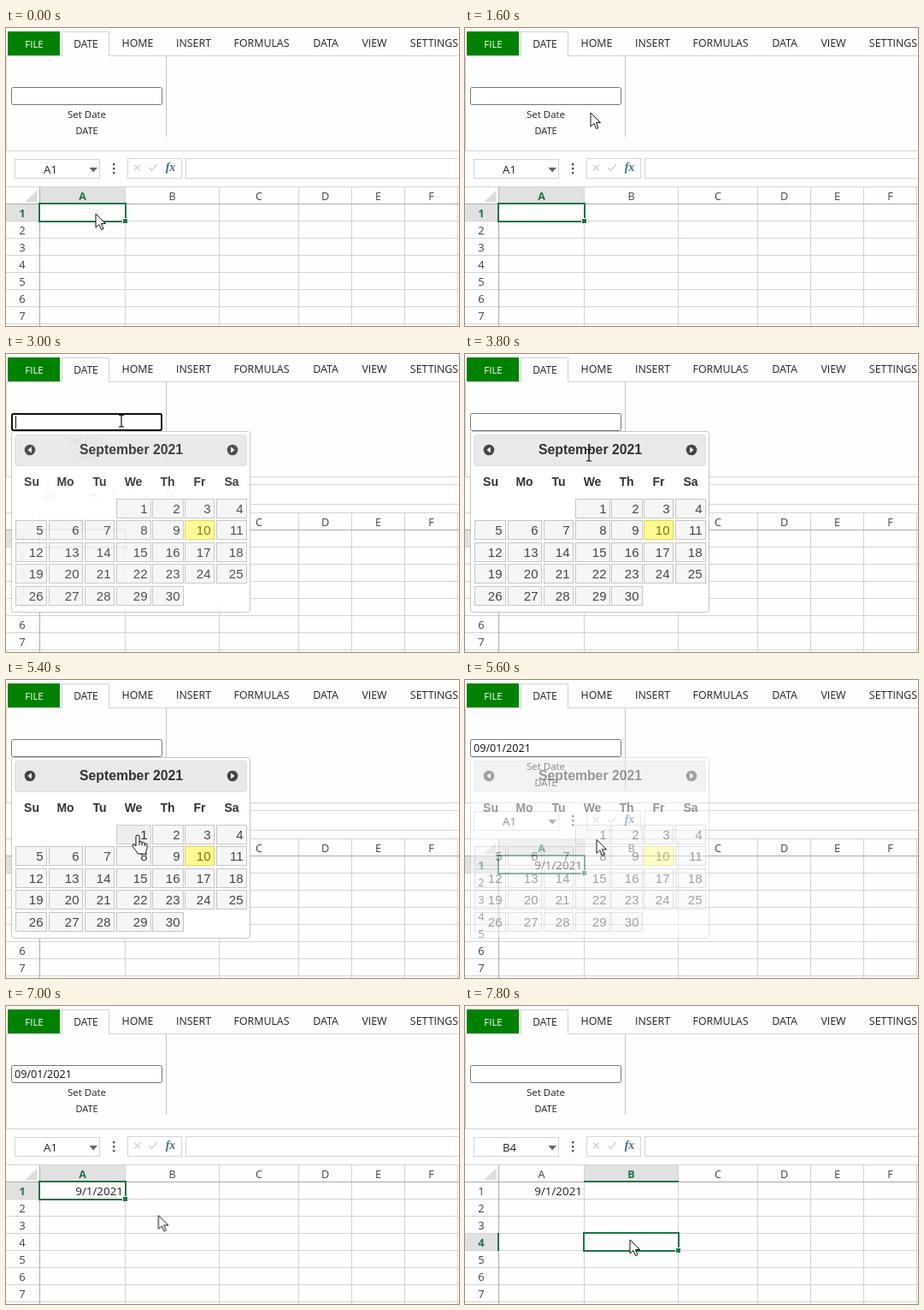
An HTML page that plays this animation: 530x348 px, repeating every 8000 ms.

```html
<!DOCTYPE html>
<html lang="en">
<head>
<meta charset="utf-8">
<title>Date picker in a spreadsheet</title>
<style>
html, body { margin: 0; width: 100%; height: 100%; overflow: hidden; background: #fefefe; }
svg { display: block; width: 530px; height: 348px; font-family: "Open Sans", sans-serif; cursor: default; }
text { white-space: pre; }
.mid { text-anchor: middle; }
.end { text-anchor: end; }
.crisp { shape-rendering: crispEdges; }
.cal text { font-family: "Liberation Sans", Arial, sans-serif; }

/* The clock ticks every 200 ms; the small lead keeps ticks clear of rounding. */
.anim { animation: 8s step-end -10ms infinite; }
#cursor { animation-name: move; }
#arrow { animation-name: arrow; }
#beam { animation-name: beam; }
#hand { animation-name: hand; }
#calendar { animation-name: calendar; }
#dayHover { animation-name: hand; }
#focus { animation-name: focus; }
#inputDate { animation-name: inputDate; }
#cellDate { animation-name: cellDate; }
#colHover { animation-name: colHover; }
#selA1 { animation-name: selA1; }
#selB4 { animation-name: selB4; }

@keyframes move {
  0% { transform: translate(105px, 217px); }
  7.5% { transform: translate(105px, 217px); animation-timing-function: steps(5); }
  20% { transform: translate(147px, 99px); animation-timing-function: steps(3); }
  27.5% { transform: translate(135px, 78px); }
  37.5% { transform: translate(135px, 78px); animation-timing-function: steps(4); }
  47.5% { transform: translate(145px, 118px); animation-timing-function: steps(6); }
  62.5% { transform: translate(154px, 181px); }
  67.5% { transform: translate(154px, 181px); animation-timing-function: steps(3); }
  75% { transform: translate(154px, 197px); animation-timing-function: steps(8); }
  95%, 100% { transform: translate(193px, 273px); }
}
@keyframes arrow {
  0%, 42.5%, 50%, 57.5%, 70%, 100% { opacity: 1; }
  25%, 45%, 55%, 60% { opacity: 0; }
}
@keyframes beam {
  0%, 42.5%, 50%, 57.5%, 100% { opacity: 0; }
  25%, 45%, 55% { opacity: 1; }
}
@keyframes hand {
  0%, 70%, 100% { opacity: 0; }
  60% { opacity: 1; }
}
@keyframes calendar {
  0%, 72.5%, 100% { opacity: 0; }
  37.5% { opacity: .94; }
  40% { opacity: 1; }
  70% { opacity: .5; }
}
@keyframes focus {
  0%, 40%, 100% { opacity: 0; }
  37.5% { opacity: 1; }
}
@keyframes inputDate {
  0%, 97.5%, 100% { opacity: 0; }
  70% { opacity: 1; }
}
@keyframes cellDate {
  0% { opacity: 0; }
  70%, 100% { opacity: 1; }
}
@keyframes colHover {
  0%, 77.5%, 100% { opacity: 0; }
  72.5% { opacity: 1; }
}
@keyframes selA1 {
  0% { opacity: 1; }
  97.5%, 100% { opacity: 0; }
}
@keyframes selB4 {
  0% { opacity: 0; }
  97.5%, 100% { opacity: 1; }
}
</style>
</head>
<body>
<svg id="stage" viewBox="0 0 530 348"></svg>
<script>
const GREEN = '#217346', LINE = '#d4d4d4', INK = '#222';

const rect = (x, y, w, h, fill, extra = '') =>
  `<rect x="${x}" y="${y}" width="${w}" height="${h}" fill="${fill}" ${extra}/>`;
const box = (x, y, w, h, fill, stroke, r = 0) =>
  rect(x + .5, y + .5, w - 1, h - 1, fill, `stroke="${stroke}" rx="${r}"`);
const text = (s, x, y, size, fill = INK, extra = 'class="mid"') =>
  `<text x="${x}" y="${y}" font-size="${size}" fill="${fill}" ${extra}>${s}</text>`;
const path = (d, fill, extra = '') => `<path d="${d}" fill="${fill}" ${extra}/>`;
const hline = (x, y, w, c = LINE) => rect(x, y, w, 1, c);
const vline = (x, y, h, c = LINE) => rect(x, y, 1, h, c);
const anim = (id, body) => `<g id="${id}" class="anim">${body}</g>`;

const cols = [39, 139, 249, 342, 404, 466, 528];
const rowTop = r => 205 + (r - 1) * 20;
const colMid = c => (cols[c] + cols[c + 1]) / 2 + .5;
const colName = c => 'ABCDEF'[c];

function ribbon() {
  const tabs = [['HOME', 154], ['INSERT', 219.5], ['FORMULAS', 299], ['DATA', 374], ['VIEW', 431], ['SETTINGS', 501]];
  return `<g class="crisp">` + hline(0, 32, 66) + hline(120, 32, 410) +
    vline(65, 4, 29) + vline(120, 4, 29) + hline(65, 4, 56) +
    vline(0, 32, 112) + hline(0, 143, 530) + vline(187, 33, 94, '#c4c4c4') +
    rect(2, 4, 61, 28, '#008200') + '</g>' +
    text('FILE', 33, 23, 11.5, '#fff') + text('DATE', 93.5, 23, 12) +
    tabs.map(([s, x]) => text(s, x, 22, 12.4)).join('') +
    box(6, 69, 177, 21, '#fff', '#767676', 2) +
    text('Set Date', 94.5, 105, 11.5) + text('DATE', 94.5, 124, 11) +
    anim('inputDate', text('09/01/2021', 10, 84, 12.6, '#111', ''));
}

function formulaBar() {
  return box(10, 153, 100, 23, '#fff', LINE) +
    path('M97.5 163H107L102.2 168.5Z', '#666') +
    [159, 164, 169].map(y => rect(125, y - 1, 2.4, 2.4, '#555')).join('') +
    box(142, 152, 64, 24, '#fff', LINE) +
    path('M150 159.500L157 166.500M157 159.500L150 166.500M167 163L170.500 166.500L177 159', 'none', 'stroke="#d2d2d2" stroke-width="1.4"') +
    text('fx', 192.500, 167, 14, '#44718f', 'class="mid" font-family="Liberation Serif, serif" font-style="italic" font-weight="bold"') +
    box(210, 152, 325, 24, '#fff', LINE);
}

function sheet() {
  let s = '<g class="crisp">' + hline(0, 185, 530);
  for (const x of cols) s += vline(x, 186, 162);
  for (let r = 2; r <= 8; r++) s += hline(0, rowTop(r), 530);
  s += hline(0, 205, 530, '#ababab') + vline(39, 186, 162, '#ababab') + '</g>';
  s += path('M36.500 189.500V203H22.500Z', '#dcdcdc');
  for (let c = 0; c < 6; c++) s += text(colName(c), colMid(c), 201, 12.6, '#444');
  for (let r = 1; r <= 7; r++) s += text(r, 19, rowTop(r) + 16, 13, '#444');
  return s + anim('colHover', rect(140, 186, 109, 19, '#9fd5b7') + text('B', colMid(1), 201, 12.6, '#444')) +
    anim('cellDate', text('9/1/2021', 137, 221, 13.4, INK, 'class="end"'));
}

function selection(c, r) {
  const x = cols[c], y = rowTop(r), w = cols[c + 1] - x;
  const bold = 'class="mid" font-weight="bold"';
  return anim('sel' + colName(c) + r,
    '<g class="crisp">' + rect(x + 1, 186, w - 1, 19, '#e1e1e1') + rect(x, 204, w + 1, 2, GREEN) +
    rect(0, y + 1, 38, 19, '#e1e1e1') + rect(38, y, 2, 21, GREEN) +
    rect(x, y, w + 1, 21, 'none', `stroke="${GREEN}" stroke-width="2"`) +
    rect(x + w - 3, y + 17, 7, 7, '#fff') + rect(x + w - 2, y + 18, 5, 5, GREEN) + '</g>' +
    text(colName(c), colMid(c), 201, 12.6, GREEN, bold) + text(r, 19, y + 16, 13, GREEN, bold) +
    text(colName(c) + r, 52, 170, 13.3));
}

function calendar() {
  const left = [11, 50, 92, 129, 171, 209, 246], right = [48, 90, 127, 170, 208, 244, 282];
  const heads = [30, 69.5, 109.5, 149, 189, 226.5, 264];
  const day = (n, fill, stroke, ink) => {
    const c = (n + 2) % 7, y = Math.round(168.5 + 25.6 * Math.floor((n + 2) / 7));
    return box(left[c], y, right[c] - left[c], 23, fill, stroke) +
      text(n, right[c] - 4.5, y + 16.5, 15, ink, 'class="end"');
  };
  const button = (x, dir) => `<circle cx="${x}" cy="112" r="6.3" fill="#444"/>` +
    path(`M${x + 2.5 * dir} 112L${x - 1.8 * dir} 108.500V115.500Z`, '#fff');
  let s = box(6, 90, 280, 212, '#fff', '#c5c5c5', 3) + box(10, 94, 272, 37, '#e9e9e9', '#dddddd', 3) +
    button(28, -1) + button(265, 1) +
    text('September 2021', 146.5, 117, 15.8, '#333', 'class="mid" font-weight="bold"');
  ['Su', 'Mo', 'Tu', 'We', 'Th', 'Fr', 'Sa'].forEach((d, i) =>
    s += text(d, heads[i], 154, 14, '#333', 'class="mid" font-weight="bold"'));
  for (let n = 1; n <= 30; n++)
    s += n === 10 ? day(n, '#fffa90', '#dad55e', '#777620') : day(n, '#f6f6f6', '#c5c5c5', '#454545');
  s += anim('dayHover', day(1, '#ededed', '#cccccc', '#2b2b2b'));
  return `<g class="cal">${anim('calendar', s)}</g>`;
}

function cursor() {
  const edge = 'stroke="#111" stroke-linejoin="round"';
  return anim('cursor',
    anim('arrow', path('M0 0V16L4 12.500L6.500 18.500L9 17.500L6.500 11.500H11.500Z', '#fff', edge)) +
    anim('beam', path('M-3 -6.500H-1L0 -5.500L1 -6.500H3M0 -5.500V6M-3 7H-1L0 6L1 7H3', 'none', 'stroke="#111" stroke-width="1.2"')) +
    anim('hand', path('M-2 2Q-2 0 0 0T2 2V8Q5 7 5 9Q8 8 8.500 10Q11 9.500 11 12V16Q10 18 9.500 22H.5Q-3 17 -6 13Q-6.500 10 -3.500 11L-2 13Z', '#fff', edge) +
      path('M2 8V12M5 9V12.500M8.500 10V13', 'none', 'stroke="#111"')));
}

const focus = anim('focus', rect(7, 70, 175, 19, 'none', 'stroke="#111" stroke-width="2" rx="2"') + vline(11, 72, 15, '#111'));

document.getElementById('stage').innerHTML = ribbon() + formulaBar() + sheet() +
  selection(0, 1) + selection(1, 4) + calendar() + focus + cursor();
</script>
</body>
</html>
```
